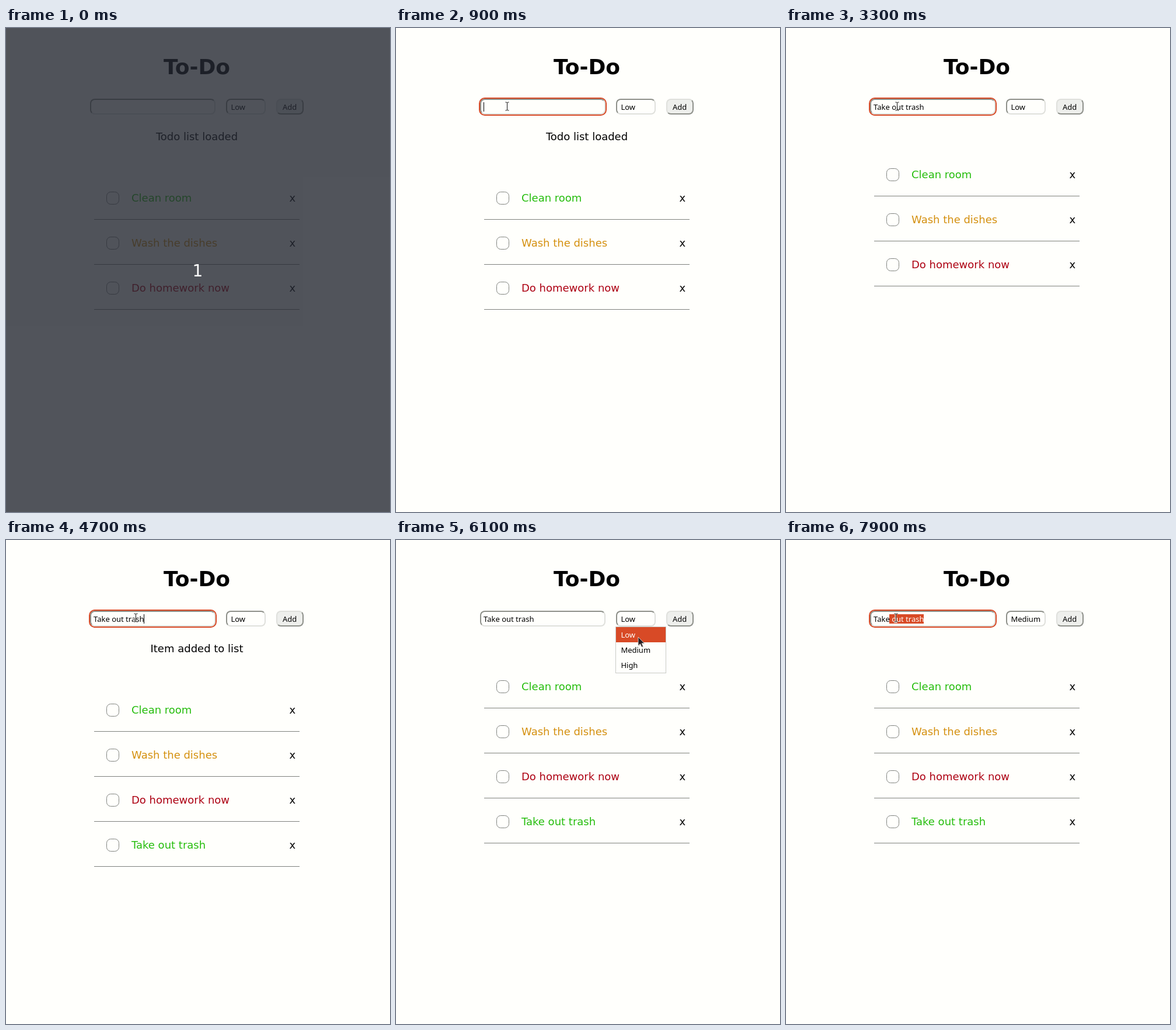
An HTML page that plays this animation: 658x828 px, repeating every 8000 ms.

```html
<!DOCTYPE html>
<html lang="en">
<head>
<meta charset="utf-8">
<title>To-Do</title>
<style>
  html, body { margin: 0; width: 100%; height: 100%; overflow: hidden; background: #fffffc; }
  #stage { position: relative; width: 658px; height: 828px; overflow: hidden; }
  .box {
    position: absolute; top: 121px; height: 27px; box-sizing: border-box;
    border: 2px solid; border-radius: 8px;
    border-color: #8e908a #dfe0dc #dfe0dc #8e908a;
  }
  #field { left: 144px; width: 215px; }
  #level { left: 377px; width: 68px; }
  #add { left: 463px; width: 47px; background: #eeefec; border-color: #dfe0dc #8e908a #8e908a #dfe0dc; }
  #ring {
    position: absolute; left: 142px; top: 119px; width: 219px; height: 31px;
    box-sizing: border-box; border: 2px solid #d84a26; border-radius: 10px;
  }
  svg { position: absolute; left: 0; top: 0; }
  text { font: 18px "DejaVu Sans", sans-serif; white-space: pre; }
  .mid { text-anchor: middle; }
  .ui { font: 13px "Noto Sans", sans-serif; }
  h1 { margin: 0; }
  #title { font-size: 36px; font-weight: bold; }
  #cover { position: absolute; inset: 0; background: rgba(37, 41, 51, .8); }
</style>
</head>
<body>
<div id="stage">
  <div id="field" class="box"></div>
  <div id="level" class="box"></div>
  <div id="add" class="box"></div>
  <div id="ring"></div>
  <svg width="658" height="828">
    <text id="title" class="mid" x="327" y="79">To-Do</text>
    <text id="status" class="mid" x="327" y="192"></text>
    <rect id="mark" y="127" height="16" fill="#d84a26"/>
    <text class="ui" x="150" y="140"><tspan id="typed"></tspan><tspan id="picked" fill="#fffffc"></tspan></text>
    <rect id="caret" y="127" width="1" height="16"/>
    <text id="choice" class="ui" x="385.4" y="140"></text>
    <text class="ui" x="474" y="140">Add</text>
    <g id="list"></g>
    <g id="menu">
      <rect x="376.5" y="148.5" width="86" height="79" fill="#fffffc" stroke="#c9cac6"/>
      <rect id="hover" x="377" width="85" height="26" fill="#d84a26"/>
    </g>
    <g id="arrow">
      <path d="M0 0V15L3.5 11.7L6 17.2L8.4 16.2L6.1 10.8H10.6Z" transform="translate(1 1)" fill="#000" opacity=".2"/>
      <path d="M0 0V15L3.5 11.7L6 17.2L8.4 16.2L6.1 10.8H10.6Z" fill="#261c20" stroke="#fffffc" stroke-width=".7"/>
    </g>
    <g id="beam" fill="none">
      <path d="M-3 -7.5H3M0 -7V7M-3 7.5H3" stroke="#fffffc" stroke-width="3" opacity=".75"/>
      <path d="M-2.5 -7H-.5L.5 -6L1.5 -7H3.5M.5 -6V6M-2.5 7H-.5L.5 6L1.5 7H3.5" stroke="#111"/>
    </g>
  </svg>
  <div id="cover">
    <svg width="658" height="828"><text class="mid" x="328.5" y="425" fill="#fff" style="font-size:28px">1</text></svg>
  </div>
</div>
<script>
const LOOP = 8000, TICK = 100;
const $ = id => document.getElementById(id);

function add(parent, tag, attrs, text = '') {
  const el = document.createElementNS('http://www.w3.org/2000/svg', tag);
  for (const key in attrs) el.setAttribute(key, attrs[key]);
  el.textContent = text;
  return parent.appendChild(el);
}

const green = '#25bd0c';
const items = [
  ['Clean room', green],
  ['Wash the dishes', '#d4900f'],
  ['Do homework now', '#ad0012'],
  ['Take out trash', green]
].map(([name, fill], i) => {
  const g = add($('list'), 'g', { transform: `translate(0 ${i * 77})` });
  add(g, 'rect', { x: 172.5, y: 280.5, width: 21, height: 21, rx: 7, fill: 'none', stroke: '#80837f' });
  add(g, 'text', { x: 215, y: 297, fill }, name);
  add(g, 'text', { x: 485.4, y: 297 }, 'x');
  add(g, 'rect', { x: 151, y: 327, width: 352, height: 1, fill: '#7e817d' });
  return g;
});

const options = ['Low', 'Medium', 'High'].map((name, i) =>
  add($('menu'), 'text', { class: 'ui', x: 385.4, y: 167 + i * 26 }, name));

// Each track lists [start time, value...]; the value holds until the next entry.
const typing = [
  [0, ''], [1600, 'T'], [1900, 'Ta'], [2000, 'Tak'], [2100, 'Take'], [2200, 'Take '],
  [2400, 'Take ou'], [2600, 'Take out '], [2800, 'Take out t'], [2900, 'Take out tr'],
  [3200, 'Take out tras'], [3300, 'Take out trash']
];
const messages = [[0, 'Todo list loaded'], [2400, ''], [3800, 'Item added to list'], [5400, '']];
const focus = [[0, false], [900, true], [5500, false], [7700, true]];
const caretOn = [[0, true], [2200, false], [2400, true], [3300, false], [3500, true], [7900, false]];
const pointer = [
  [0, null], [200, 'arrow', 168, 24], [300, 'arrow', 174, 80], [500, 'arrow', 181, 104],
  [600, 'beam', 190, 134], [4700, 'beam', 222, 133], [4800, 'beam', 268, 135],
  [4900, 'beam', 315, 135], [5000, 'arrow', 362, 131], [5100, 'arrow', 391, 127],
  [5200, 'arrow', 403, 124], [5900, 'arrow', 406, 136], [6000, 'arrow', 411, 152],
  [6100, 'arrow', 415, 166], [6200, 'arrow', 417, 178], [6300, 'arrow', 417, 187],
  [6500, 'arrow', 408, 189], [7200, 'arrow', 392, 180], [7300, 'arrow', 350, 162],
  [7400, 'beam', 306, 146], [7500, 'beam', 280, 141], [7900, 'beam', 188, 133]
];

const at = (track, t) => track.findLast(step => step[0] <= t).slice(1);
const show = (el, on) => { el.style.display = on ? '' : 'none'; };

function drawField(t) {
  const [value] = at(typing, t);
  const [focused] = at(focus, t);
  const cut = t >= 7900 ? 4 : value.length;
  $('typed').textContent = value.slice(0, cut);
  $('picked').textContent = value.slice(cut);
  const start = 150 + (cut ? $('typed').getComputedTextLength() : 0);
  show($('ring'), focused);
  show($('caret'), focused && at(caretOn, t)[0]);
  $('caret').setAttribute('x', Math.floor(start));
  show($('mark'), cut < value.length);
  $('mark').setAttribute('x', Math.floor(start));
  $('mark').setAttribute('width', 236 - Math.floor(start));
}

function drawMenu(t) {
  const row = t < 6200 ? 0 : 1;
  show($('menu'), t >= 5500 && t < 6900);
  $('hover').setAttribute('y', 149 + row * 26);
  options.forEach((el, i) => el.setAttribute('fill', i === row ? '#fffffc' : '#000'));
  $('choice').textContent = t < 7000 ? 'Low' : 'Medium';
}

function drawPointer(t) {
  const [kind, x, y] = at(pointer, t);
  for (const name of ['arrow', 'beam']) {
    show($(name), kind === name);
    if (kind === name) $(name).setAttribute('transform', `translate(${x} ${y})`);
  }
}

function draw(t) {
  const [message] = at(messages, t);
  $('status').textContent = message;
  $('list').setAttribute('transform', `translate(0 ${message ? 0 : -40})`);
  show(items[3], t >= 3800);
  show($('cover'), t < 100);
  drawField(t);
  drawMenu(t);
  drawPointer(t);
}

let last = -1;
function frame() {
  const t = Math.floor(performance.now() % LOOP / TICK) * TICK;
  if (t !== last) draw(last = t);
  requestAnimationFrame(frame);
}
frame();
</script>
</body>
</html>
```
